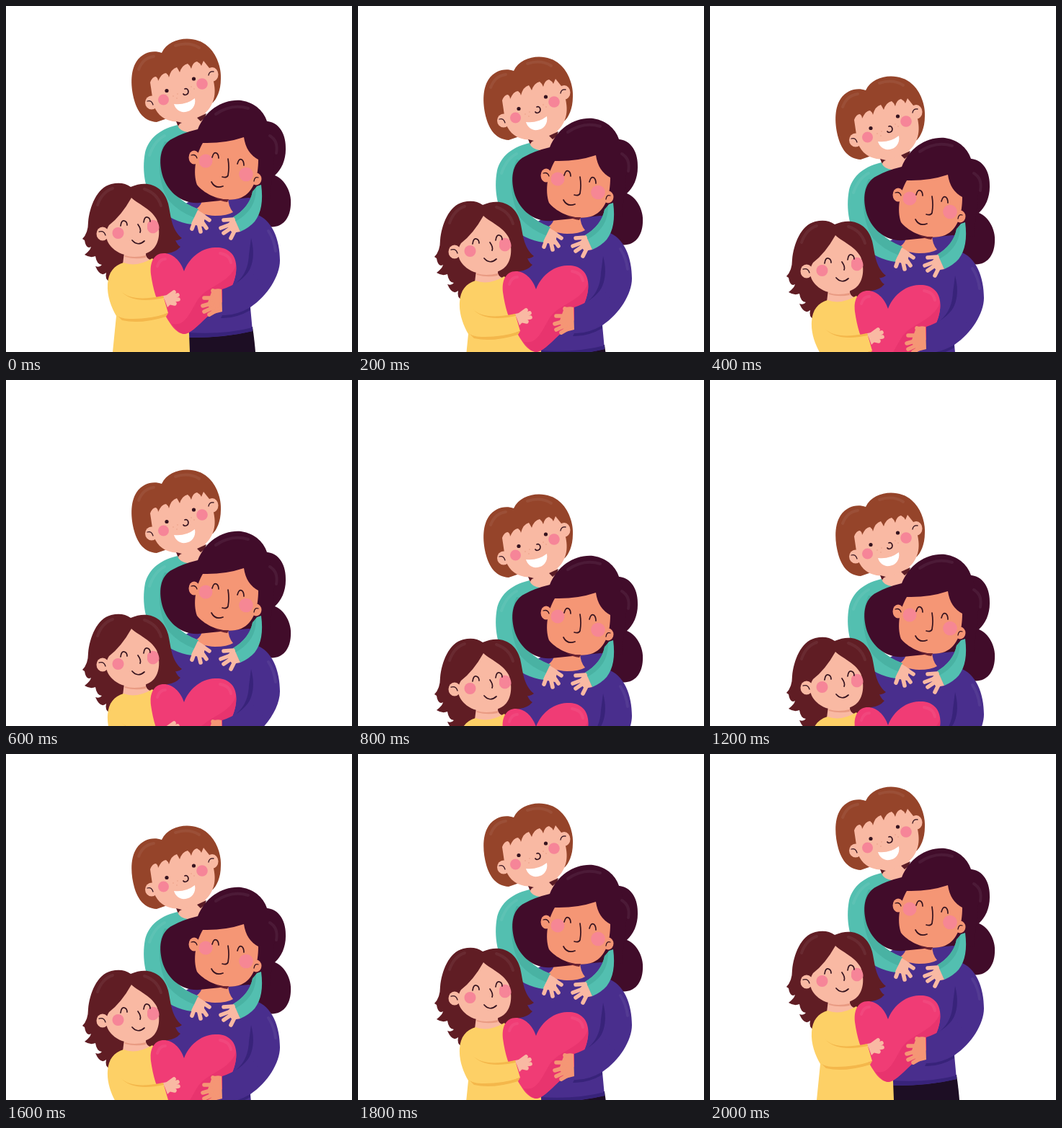
Write an HTML page that moves like this. It is 480 px wide and 480 px high and loops after 2.2 s.

```html
<!DOCTYPE html>
<html lang="en">
<head>
<meta charset="utf-8">
<title>Family hug</title>
<style>
  html, body { margin: 0; height: 100%; overflow: hidden; background: #fff; }
  svg { display: block; width: 100vw; height: 100vh; }
  .boy-hair { fill: #95442a; }
  .mom-hair { fill: #410c2a; }
  .girl-hair { fill: #601d24; }
  .light { fill: #f9b9a3; }
  .tan { fill: #f59675; }
  .teal { fill: #53bfb0; }
  .teal-dark { fill: #49b2a3; }
  .purple { fill: #492e8d; }
  .purple-dark { fill: #38237a; }
  .yellow { fill: #fdd066; }
  .yellow-dark { fill: #f4b74b; }
  .cheek { fill: #f68598; }
  .ink { fill: none; stroke: #35131f; stroke-width: 1.7; stroke-linecap: round; stroke-linejoin: round; }
  .thin { stroke-width: 1.3; }
  .shine { fill: none; stroke: #fff; stroke-opacity: .06; stroke-width: 4; stroke-linecap: round; }
  .fingers { stroke-width: 5.6; stroke-linecap: round; }
  .fingers.light { fill: none; stroke: #f9b9a3; }
  .fingers.tan { fill: none; stroke: #f59675; }
</style>
</head>
<body>
<svg viewBox="0 0 480 480">
  <g id="family">
    <!-- boy's head -->
    <path class="light" d="M235 154 L277 144 Q275 153 279 157 L262 182 L235 180 Q240 170 235 154Z"/>
    <path class="boy-hair" d="M216 65 C227 42 263 40 280 56 C292 66 299 86 298 101 C298 118 292 129 287 134 L209 161 C192 160 183 148 178 131 C173 113 172 91 181 77 C190 64 204 61 216 65Z"/>
    <path class="shine" d="M184 88 Q190 72 205 70 M235 55 Q254 49 268 58"/>
    <path class="light" d="M200 106 Q203 98 208 98 Q211 100 211 104 Q216 93 222 93 Q225 95 226 99 Q229 87 237 85 Q239 88 241 92 Q244 82 252 80 Q256 83 257 87 Q259 78 265 77 Q269 79 271 83 L274 76 Q278 81 282 86 C289 103 294 123 284 139 C274 157 250 163 231 160 C216 157 207 148 204 133Z"/>
    <ellipse class="light" cx="202" cy="134" rx="9" ry="9.5"/>
    <ellipse class="light" cx="286" cy="95" rx="8.500" ry="10"/>
    <path class="ink thin" d="M196 132 Q202 130 204 137 M281 96 Q282 90 288 91"/>
    <circle class="cheek" cx="218.500" cy="130" r="7.500"/>
    <circle class="cheek" cx="272" cy="108" r="7.800"/>
    <circle cx="223" cy="117.500" r="2.600" fill="#35131f"/>
    <circle cx="260.500" cy="101" r="2.600" fill="#35131f"/>
    <path class="ink" d="M248 115 C253 113 255 121 250 123 Q247 124 246 122"/>
    <path fill="#fff" d="M233 136 Q249 138 262 128 C264 139 257 146 249 147 C241 148 235 143 233 136Z"/>
    <g fill="#e59a80"><circle cx="232" cy="125" r=".7"/><circle cx="238" cy="122" r=".7"/><circle cx="237" cy="128" r=".7"/><circle cx="257" cy="112" r=".7"/><circle cx="261" cy="115" r=".7"/></g>
    <path fill="#5a1c26" d="M236 160 L244 162 Q240 163 239 167Z M265 155 L278 149 L276 155 L270 160Z"/>

    <!-- mother's back hair and body -->
    <path class="mom-hair" d="M355 160 C379 157 389 179 388 199 C388 214 382 227 373 235 C385 239 397 257 395 276 C394 296 382 309 364 306 L330 280Z"/>
    <path fill="#1d0e24" d="M238 445 H342 Q345 466 346 480 H233Z"/>
    <path class="purple" d="M222 299 Q240 276 262 268 L338 255 L345 288 C370 296 380 325 380 353 C380 374 363 402 339 418 L342 451 Q300 461 250 460 L215 375Z"/>
    <path class="purple-dark" d="M340 322 C348 352 341 382 300 396 C326 385 336 368 337 345Z M300 429 Q318 430 339 418 L339 422 Q318 434 298 433Z M253 453 Q304 456 342 446 L342 451 Q304 460 253 460Z"/>
    <path class="shine" d="M364 312 Q372 324 374 340"/>
    <path class="tan" d="M273 256 Q275 275 263 282 Q270 290 290 291 Q307 291 315 286 Q308 278 308 264Z"/>

    <!-- boy's left sleeve -->
    <path class="teal" d="M238 165 C208 172 197 188 193 203 C188 229 193 260 210 279 C222 292 240 301 258 303 L267 282 Q249 275 238 267 L265 180 L252 175 Q240 173 238 165Z"/>
    <path class="teal-dark" d="M220 188 C209 211 211 246 226 270 Q239 285 262 294 L267 282 Q249 275 238 264 L236 190Z"/>
    <path class="shine" d="M199 207 Q206 187 220 180"/>

    <!-- mother's head -->
    <path class="mom-hair" d="M266 171 C277 144 301 129 326 131 C346 134 359 147 363 163 L374 190 L366 268 L336 266 L268 273 C246 275 226 260 218 238 C211 216 213 193 231 184 Q245 176 266 171Z"/>
    <path class="shine" d="M291 150 Q313 135 336 142 M366 180 Q378 187 375 204"/>
    <path class="tan" d="M273 190 Q303 191 330 182 Q333 204 350 213 C350 237 344 258 326 266 C304 274 277 263 265 248 C259 231 263 207 273 190Z"/>
    <ellipse class="tan" cx="261" cy="210" rx="7.500" ry="9.500"/>
    <ellipse class="tan" cx="347" cy="240" rx="7.500" ry="8.500"/>
    <path class="ink thin" d="M257 207 Q263 205 265 211 M344 243 Q345 236 350 238"/>
    <circle class="cheek" cx="277" cy="215" r="9.500" fill-opacity=".9"/>
    <circle class="cheek" cx="333" cy="233.500" r="9.800" fill-opacity=".9"/>
    <path class="ink" d="M286 210 Q288 202 292 204 Q295 206 295 211 M321 219 Q323 211 327 213 Q330 215 330 221 M308 212 Q310 224 308 235 Q306 239 300 237 M285 244 Q290 254 301 250"/>
    <path fill="#6b2231" d="M289 266 Q300 269 309 268 L307 272 Q298 271 289 266Z"/>

    <!-- boy's right sleeve and hands -->
    <path class="teal" d="M348 250 L354 248 C357 271 354 287 345 299 Q337 308 325 313 L315 293 Q338 279 342 258Z"/>
    <path class="teal-dark" d="M347 252 C347 274 337 289 318 299 L315 293 Q338 279 342 257Z"/>
    <path class="light" d="M266 283 L277 290 L273 306 L263 304 L257 302Z M316 293 L325 313 L314 315 L306 304Z"/>
    <path class="fingers light" d="M270 289 L282 297 M269 295 L278 308 M266 296 L270 313 M262 298 L258 309 M315 296 L302 297 M314 302 L298 308 M315 306 L302 315 M319 308 L312 322"/>

    <!-- girl -->
    <path class="girl-hair" d="M173 251 C198 240 219 251 225 274 C229 291 229 310 244 322 Q239 326 235 325 Q238 332 242 334 Q235 342 224 343 L199 359 L159 379 L143 382 Q137 379 139 370 Q131 377 124 361 Q130 363 133 359 Q126 359 124 347 Q117 350 109 345 Q117 339 118 334 Q111 338 109 325 L106 323 Q114 315 114 300 C116 278 126 252 146 247 Q162 243 173 251Z"/>
    <path class="shine" d="M127 276 Q133 258 148 253 M192 254 Q210 260 215 277"/>
    <path class="light" d="M164 342 L194 342 Q193 350 202 353 Q187 364 162 358Z"/>
    <path fill="#e99b83" d="M165 346 Q177 350 194 346 L194 349 Q179 352 165 348Z"/>
    <path class="light" d="M174 266 C182 274 201 281 209 296 C215 311 213 331 202 339 C187 350 161 349 148 336 C137 326 137 313 143 304 Q160 291 174 266Z"/>
    <ellipse class="light" cx="134" cy="316" rx="8.500" ry="9.500"/>
    <path class="ink thin" d="M129 313 Q136 311 138 318"/>
    <circle class="cheek" cx="155.500" cy="315" r="8"/>
    <path class="cheek" d="M196 306 A8 8 0 0 1 211 301 Q214 309 211 311 A8 8 0 0 1 196 306Z"/>
    <path class="ink" d="M159 305 Q160 297 164 298 Q168 299 168 304 M191 300 Q192 292 196 293 Q200 294 200 299 M183 303 Q188 310 186 314 M175 325 Q183 334 192 326"/>
    <path class="yellow" d="M163 356 Q181 363 203 350 L222 375 L254 454 L255 480 H148 L153 430 C146 418 140 402 141 386 C142 369 150 360 163 356Z"/>

    <!-- heart, its shaded side and the hands around it -->
    <path fill="#f03c75" d="M247 368 C242 353 231 343 219 343 C205 343 199 356 201 372 C204 393 209 410 218 424 C227 440 235 454 247 455 C257 455 271 438 291 420 C310 402 322 377 319 357 C317 341 304 334 290 335 C268 336 253 352 247 368Z"/>
    <path fill="#e8346e" d="M319 360 C321 379 309 404 291 420 C271 438 257 455 247 455 C240 454 235 447 230 441 C250 445 255 424 267 406 C282 387 309 385 319 360Z"/>
    <path class="shine" d="M297 343 Q310 345 312 356 M210 361 Q213 351 221 351"/>
    <path class="yellow" d="M146 398 C151 421 153 431 170 434 Q197 436 225 426 L218 402 Q190 413 164 398Z"/>
    <path class="yellow-dark" d="M160 396 Q174 411 218 402 L219 405 Q176 414 160 396Z M152 427 Q157 434 171 434 Q198 435 225 426 L222 431 Q186 442 161 436Z"/>
    <path class="light" d="M218 402 L229 400 L232 410 L224 418Z"/>
    <path class="fingers light" d="M222 405 L233 397 M226 405 L238 401 M226 409 L239 407 M225 411 L234 413"/>
    <path class="purple" d="M300 393 Q327 384 338 366 L362 394 Q337 427 300 428Z"/>
    <path class="tan" d="M286 394 Q293 391 299 393 L300 424 L288 427 L279 414Z"/>
    <path class="fingers tan" d="M293 397 L287 395 M288 405 L275 405 M287 412 L273 416 M288 418 L275 424 M294 421 L282 428"/>
  </g>
</svg>
<script>
  const family = document.getElementById("family");
  const STEP = 200;
  const drops = [0, 25, 52, 79, 113, 140, 111, 82, 54, 23, 0];

  function draw() {
    const step = Math.floor(performance.now() / STEP) % drops.length;
    family.setAttribute("transform", `translate(0 ${drops[step]})`);
    requestAnimationFrame(draw);
  }
  draw();
</script>
</body>
</html>
```
